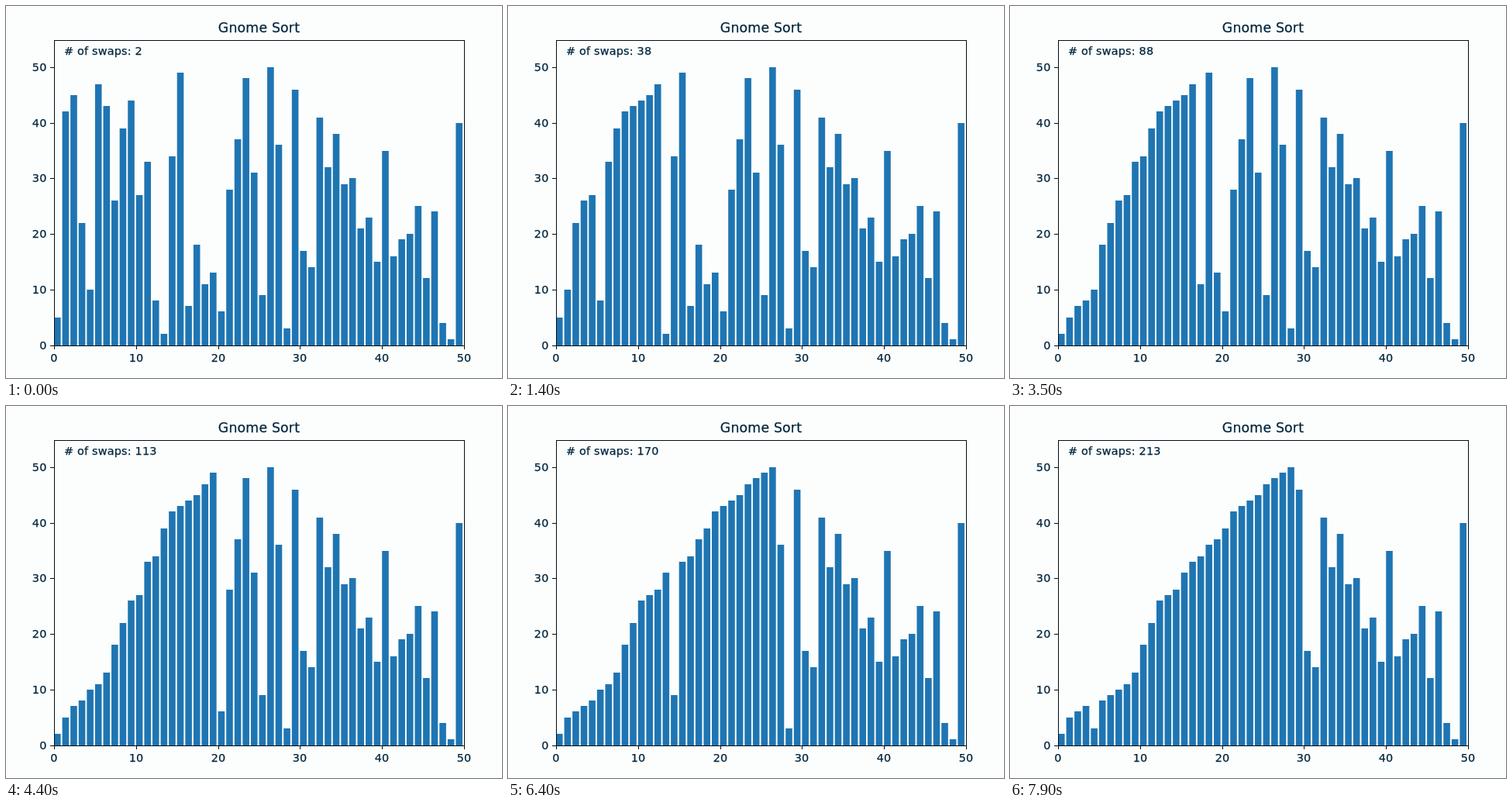
An HTML page with a canvas for the animation above (8000 ms loop, 640 by 480 pixels).

```html
<!DOCTYPE html>
<html lang="en">
<head>
<meta charset="utf-8">
<title>Gnome Sort</title>
<style>
  html, body { margin: 0; width: 100%; height: 100%; overflow: hidden; background: #fcfefd; }
  canvas { display: block; }
</style>
</head>
<body>
<canvas id="stage" width="640" height="480"></canvas>
<script>
const ctx = document.getElementById('stage').getContext('2d');
const LEFT = 62, RIGHT = 591, TOP = 44, BOTTOM = 438;
const PAPER = '#fcfefd', INK = '#02263e', BAR = '#1f75b2', FRAME = '#000c18';

// The shuffled values 1 to 50 that get sorted
const START = [
  5, 42, 45, 22, 10, 47, 43, 26, 39, 44, 27, 33, 8, 2, 34, 49, 7,
  18, 11, 13, 6, 28, 37, 48, 31, 9, 50, 36, 3, 46, 17, 14, 41, 32,
  38, 29, 30, 21, 23, 15, 35, 16, 19, 20, 25, 12, 24, 4, 1, 40
];
// [tick, swaps done]; one tick is 100 ms
const PACE = [[0, 2], [14, 38], [15, 38], [23, 57], [35, 88], [53, 138], [79, 213]];

const xOf = i => LEFT + 10.58 * i;
const yOf = v => Math.floor(BOTTOM - 7.17 * v);

function swapsAt(tick) {
  const n = Math.max(1, PACE.findIndex(p => p[0] >= tick));
  const [t0, s0] = PACE[n - 1], [t1, s1] = PACE[n];
  return Math.round(s0 + (s1 - s0) * (tick - t0) / (t1 - t0));
}

function sortUntil(limit) {
  const a = START.slice();
  let swaps = PACE[0][1], i = 1;
  while (swaps < limit) {
    if (i === 0 || a[i] >= a[i - 1]) {
      i++;
    } else {
      [a[i - 1], a[i]] = [a[i], a[i - 1]];
      swaps++;
      i--;
    }
  }
  return a;
}

function text(s, x, y, align, size = 14.4) {
  ctx.font = `${size}px "DejaVu Sans", sans-serif`;
  ctx.letterSpacing = '0.2px';
  ctx.textAlign = align;
  ctx.fillStyle = ctx.strokeStyle = INK;
  ctx.lineWidth = 0.25;
  ctx.fillText(s, x, y);
  ctx.strokeText(s, x, y);
}

function drawAxes() {
  ctx.strokeStyle = FRAME;
  ctx.lineWidth = 1;
  ctx.strokeRect(LEFT + 0.5, TOP + 0.5, RIGHT - LEFT, BOTTOM - TOP);
  for (let v = 0; v <= 50; v += 10) {
    const x = Math.round(xOf(v)), y = yOf(v);
    ctx.fillStyle = FRAME;
    ctx.fillRect(x, BOTTOM, 1, 5);
    ctx.fillRect(LEFT - 5, y, 5, 1);
    text(v, x, 459, 'center');
    text(v, 52.5, y + 5, 'right');
  }
  text('Gnome Sort', 326.5, 34, 'center', 17.3);
}

function draw() {
  const swaps = swapsAt(Math.floor(performance.now() / 100) % 80);
  ctx.fillStyle = PAPER;
  ctx.fillRect(0, 0, 640, 480);
  ctx.fillStyle = BAR;
  sortUntil(swaps).forEach((v, i) => {
    ctx.fillRect(xOf(i), yOf(v), 8.6, BOTTOM - yOf(v));
  });
  drawAxes();
  text(`# of swaps: ${swaps}`, 75, 63, 'left');
  requestAnimationFrame(draw);
}
draw();
</script>
</body>
</html>
```
